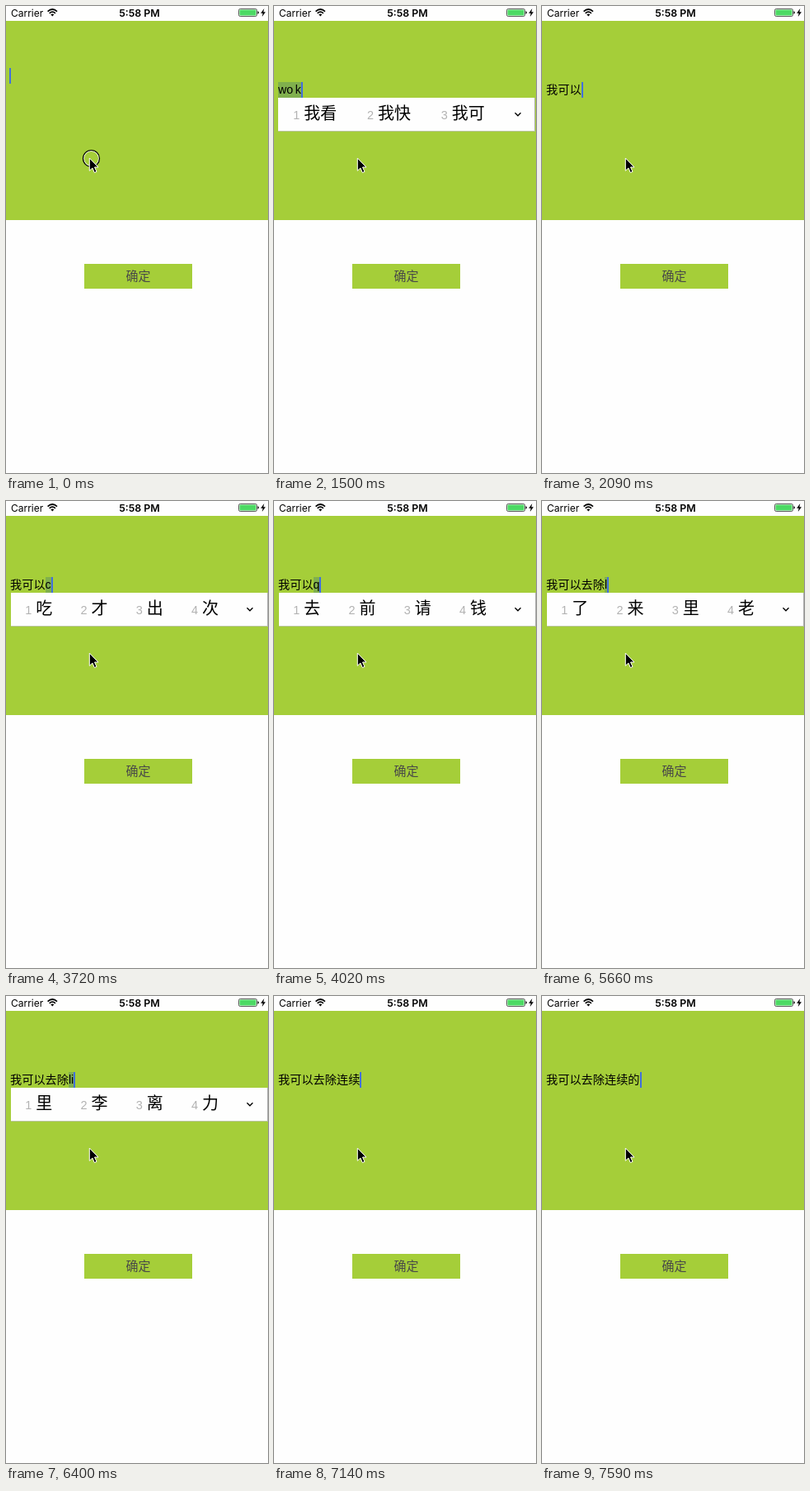
Write an HTML page that moves like this. It is 318x565 px and loops after 8000 ms.

```html
<!DOCTYPE html>
<html lang="zh-CN">
<head>
<meta charset="utf-8">
<title>Pinyin input</title>
<style>
  html, body { margin: 0; width: 100%; height: 100%; overflow: hidden; background: #fefefe; }
  body { position: relative; font-family: "Liberation Sans", "Noto Sans CJK SC", sans-serif; color: #000; }
  svg, .field, .line, .popup, .button { position: absolute; white-space: pre; }
  svg { left: 0; top: 0; }
  .field { left: 0; top: 18px; width: 318px; height: 241px; background: #a5ce39; }
  .button { left: 95px; top: 312px; width: 131px; height: 30px; background: #a5ce39;
    color: #484848; font-size: 15px; line-height: 30px; text-align: center; }
  .line { left: 5px; top: 92px; display: flex; height: 19px; font-size: 14.2px; line-height: 19px; }
  .mark { background: #80b04d; word-spacing: -1.4px; }
  .caret { width: 2px; height: 19px; background: #4270db; }
  .popup { top: 111px; width: 312px; height: 40px; background: #fefefe; border-bottom: 1px solid #b9c59a;
    box-sizing: border-box; height: 41px; border-right: 1px solid #b4b4b4; }
  .words { display: flex; justify-content: space-around; width: 269px; line-height: 39px; font-size: 20px; }
  .words i { display: inline-block; width: 13px; font: 14.5px/39px "Liberation Sans", sans-serif; color: #b2b2b2; }
</style>
</head>
<body>
<div class="field"></div>
<div class="button">确定</div>
<div class="line" id="line"><span id="done"></span><span class="mark" id="mark"></span><span class="caret" id="caret"></span></div>
<div class="popup" id="popup"><div class="words" id="words"></div></div>
<svg width="318" height="565" viewBox="0 0 318 565" font-family="Inter, sans-serif" font-size="12">
  <text x="6" y="12.5">Carrier</text>
  <text x="162" y="12.5" font-size="12.4" font-weight="600" text-anchor="middle">5:58 PM</text>
  <g fill="none" stroke="#000" stroke-width="1.7">
    <path d="M50.6 6.6Q56.3 1.4 62 6.6M52.7 8.8Q56.3 5.6 59.9 8.8"/>
    <path d="M54.3 10.3Q56.3 8.7 58.3 10.3L56.3 12.6Z" fill="#000" stroke="none"/>
  </g>
  <rect x="282.5" y="3.5" width="22" height="9" rx="1.8" fill="none" stroke="#333" stroke-width=".8"/>
  <rect x="283.5" y="4.5" width="20" height="7" rx=".8" fill="#4cd964"/>
  <path d="M305.5 6.3Q307 6.6 307 8T305.5 9.7Z"/>
  <path d="M313.3 3L309.2 8.7H311.7L310.8 13L315 7.2H312.4Z"/>
  <path d="M292.5 129.3L296 132.7L299.5 129.3" id="arrow" fill="none" stroke="#000" stroke-width="1.4"/>
  <g id="touch" fill="none">
    <circle cx="103.5" cy="184.5" r="9" stroke="#fff"/>
    <circle cx="103.5" cy="184.5" r="10" stroke="#000" stroke-width="1.2"/>
  </g>
  <path d="M101.3 184V199.3L104.9 196L107.4 201.6L110 200.4L107.5 195H112Z" stroke="#fff" stroke-width="1" stroke-linejoin="round"/>
</svg>
<script>
  const LOOP = 8000;
  // time, committed text, pinyin being typed, candidates
  const steps = [
    [0, "", "", ""],
    [900, "", "w", "我 为 无 问"],
    [1050, "", "wo", "我 窝 握 卧"],
    [1500, "", "wo k", "我看 我快 我可"],
    [1650, "", "wo ke", "我可 我课 我刻"],
    [1800, "", "wo ke y", "我可以 我科研"],
    [1950, "", "wo ke yi", "我可以 我可疑"],
    [2090, "我可以", "", ""],
    [2680, "我可以", "ch", "吃 出 车 长"],
    [3720, "我可以", "c", "吃 才 出 次"],
    [3870, "我可以", "", ""],
    [4010, "我可以", "q", "去 前 请 钱"],
    [4160, "我可以", "qu", "去 取 区 曲"],
    [4460, "我可以", "qu c", "去除 去吃 取出"],
    [4610, "我可以", "qu ch", "去除 去吃 取出"],
    [4760, "我可以", "qu chu", "去除 去除连续 取出"],
    [5060, "我可以去除", "", ""],
    [5660, "我可以去除", "l", "了 来 里 老"],
    [6400, "我可以去除", "li", "里 李 离 力"],
    [6550, "我可以去除", "lian", "连 脸 练 联"],
    [6690, "我可以去除", "lian x", "连续 练习 联系"],
    [6840, "我可以去除", "lian xu", "连续 练需 联续"],
    [7140, "我可以去除连续", "", ""],
    [7440, "我可以去除连续", "d", "的 都 到 大"],
    [7590, "我可以去除连续的", "", ""]
  ];
  const el = id => document.getElementById(id);
  const [line, done, mark, caret, popup, words, arrow, touch] =
    ["line", "done", "mark", "caret", "popup", "words", "arrow", "touch"].map(el);
  let shown;

  function showStep(step) {
    const [, text, pinyin, list] = step;
    done.textContent = text;
    mark.textContent = pinyin;
    caret.style.marginLeft = text || pinyin ? 0 : "-1px";
    popup.style.left = text ? "6px" : "5px";
    popup.style.visibility = arrow.style.visibility = list ? "visible" : "hidden";
    words.innerHTML = list && list.split(" ").map((w, i) => `<span><i>${i + 1}</i>${w}</span>`).join("");
    shown = step;
  }

  function draw(now) {
    const t = now % LOOP;
    const step = steps.findLast(s => s[0] <= t);
    if (step !== shown) showStep(step);
    line.style.top = t < 150 ? "75px" : "92px";
    touch.style.opacity = t < 150 ? 1 : t < 300 ? 0.5 : 0;
    caret.style.opacity = t < 3280 || t >= 3720 ? 1 : t < 3420 ? 0.5 : 0;
    requestAnimationFrame(draw);
  }
  draw(0);
</script>
</body>
</html>
```
